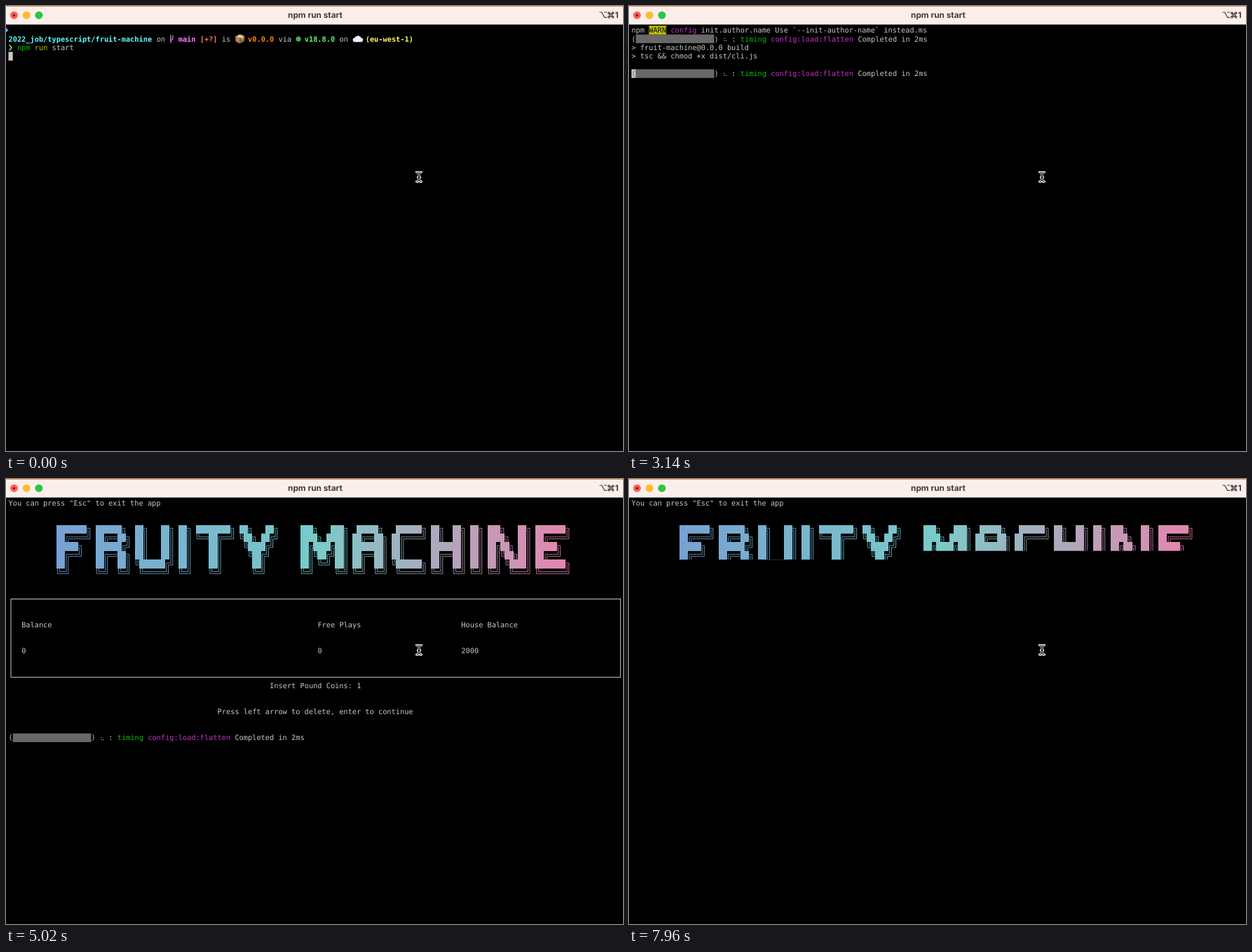
An HTML page that plays this animation: 880 px wide and 636 px high, repeating every 8 s.

```html
<!DOCTYPE html>
<html lang="en">
<head>
<meta charset="utf-8">
<title>npm run start</title>
<style>
  html, body { margin: 0; width: 100%; height: 100%; overflow: hidden; background: #000; }
  svg { display: block; width: 880px; height: 636px; }
  text { font: 10.315px 'DejaVu Sans Mono', monospace; text-rendering: geometricPrecision; }
  text.b { font-weight: 700; }
  text.ui { font: 700 11.8px Inter, sans-serif; fill: #413c3b; }
</style>
</head>
<body>
<svg viewBox="0 0 880 636">
  <defs>
    <linearGradient id="teen" gradientUnits="userSpaceOnUse" x1="71.8" x2="804.6" y1="0" y2="0">
      <stop offset="0" stop-color="#77a1d3"/>
      <stop offset=".5" stop-color="#79cbca"/>
      <stop offset="1" stop-color="#e684ae"/>
    </linearGradient>
    <clipPath id="partial"><path d="M0 0H880V102.8H409V115.2H0z"/></clipPath>
  </defs>
  <rect width="880" height="636"/>
  <rect width="880" height="26.5" fill="#fceeeb"/>
  <rect width="880" height="1" fill="#f2974f"/>
  <circle cx="11.5" cy="13.2" r="5.5" fill="#fe5f57"/>
  <circle cx="11.5" cy="13.2" r="1.7" fill="#7d0c08"/>
  <circle cx="29.2" cy="13.2" r="5.5" fill="#febb2e"/>
  <circle cx="46.9" cy="13.2" r="5.5" fill="#28c840"/>
  <text class="ui" x="441" y="17" text-anchor="middle">npm run start</text>
  <g fill="none" stroke="#413c3b" stroke-width="1.2">
    <path d="M846.5 9h3.2l4 7.4h3.3M853 9h4"/>
    <path d="M861.2 9.9v6M864.2 9.9v6M859.7 11.4h6M859.7 14.4h6"/>
    <circle cx="859.9" cy="10.1" r="1.3"/><circle cx="865.5" cy="10.1" r="1.3"/>
    <circle cx="859.9" cy="15.7" r="1.3"/><circle cx="865.5" cy="15.7" r="1.3"/>
  </g>
  <text class="ui" x="873.5" y="17" text-anchor="end">1</text>
  <g id="screen"></g>
  <g fill="none" stroke-linecap="round">
    <path id="beam" stroke="#fff" stroke-width="2.8"
      d="M585.6 237.4q3.4 0 3.4 2.6v8.4q0 2.6-3.4 2.6M592.4 237.4q-3.4 0-3.4 2.6v8.4q0 2.6 3.4 2.6M587.4 245h3.2"/>
    <use href="#beam" style="stroke:#000"/>
    <path stroke="#000" stroke-width="1"
      d="M585.6 237.4q3.4 0 3.4 2.6v8.4q0 2.6-3.4 2.6M592.4 237.4q-3.4 0-3.4 2.6v8.4q0 2.6 3.4 2.6M587.4 245h3.2"/>
  </g>
</svg>
<script>
const LOOP = 8000, CW = 6.21, CH = 12.42;
const FG = '#c7c7c7', GREEN = '#00c200', YELLOW = '#c7c400', MAGENTA = '#c930c7';
const px = col => 3.5 + col * CW;
const py = row => 28.3 + row * CH;

const text = (row, col, str, fill = FG, bold = false) =>
  `<text x="${px(col)}" y="${py(row) + 9.8}" fill="${fill}"${bold ? ' class="b"' : ''}>${str}</text>`;
const block = (row, col, n, fill) =>
  `<rect x="${px(col)}" y="${py(row)}" width="${n * CW}" height="${CH}" fill="${fill}"/>`;
const place = (x, y, shapes) => `<g transform="translate(${x} ${y})">${shapes}</g>`;

// Terminal lines
const bar = row => text(row, 0, '(') + block(row, 1, 18, '#686868') + text(row, 19, ')') +
  place(px(21), py(row), [[2.1, 5.8], [2.1, 8.8], [4.7, 8.8]].map(([x, y]) =>
    `<circle cx="${x}" cy="${y}" r=".75" fill="#aaa"/>`).join('')) +
  text(row, 23, ':') + text(row, 25, 'timing', GREEN) +
  text(row, 32, 'config:load:flatten', MAGENTA) + text(row, 52, 'Completed in 2ms');

const carton = place(327, 40.2,
  '<path fill="#dcb07e" d="M0 3.4 7 .4 13.6 3 6.6 6.6z"/><path fill="#b98450" d="M0 3.4 6.6 6.6V13.6L.6 10.4z"/>' +
  '<path fill="#94653b" d="M6.6 6.6 13.6 3 13 10 6.6 13.6z"/><path fill="#eedcbc" d="M3 2 9.6 5v2.6L11 7V4.4L4.6 1.4z"/>');
const cloud = '<path fill="#eef1f6" d="M497.6 51.4a2.9 2.9 0 0 1-.2-5.8 3 3 0 0 1 3-2.4 4 4 0 0 1 6 2.4 2.9 2.9 0 0 1-.2 5.8z"/>';
const branch = '<path d="M234.9 41.5V53M234.9 49.3q3-.8 3-3.6V42" fill="none" stroke="#ff77ff" stroke-width="1.2"/>';

const prompt = '<path fill="#6ea8f2" d="M0 31 3.5 34.5 0 38z"/>' +
  text(1, 0, '2022_job/typescript/fruit-machine', '#60fdff', true) + text(1, 34, 'on') + branch +
  text(1, 39, 'main', '#ff77ff', true) + text(1, 44, '[+?]', '#ff6e67', true) + text(1, 49, 'is') + carton +
  text(1, 55, 'v0.0.0', '#ff8700', true) + text(1, 62, 'via') +
  '<circle cx="417" cy="47.2" r="3.6" fill="#3fae49"/>' +
  text(1, 68, 'v18.8.0', '#5ffa68', true) + text(1, 76, 'on') + cloud +
  text(1, 82, '(eu-west-1)', '#fffc67', true) +
  '<path d="M4.8 55.4 8 59.5 4.8 63.6" fill="none" stroke="#5ffa68" stroke-width="1.6"/>' +
  text(2, 2, 'npm', GREEN) + text(2, 6, 'run', YELLOW) + text(2, 10, 'start') + block(3, 0, 1, FG);

const warn = text(0, 0, 'npm') + block(0, 4, 4, YELLOW) + text(0, 4, 'WARN', '#000') +
  text(0, 9, 'config', MAGENTA) + text(0, 16, 'init.author.name Use `--init-author-name` instead.ms');
const build = warn + bar(1) + text(2, 0, '&gt; fruit-machine@0.0.0 build') +
  text(3, 0, '&gt; tsc &amp;&amp; chmod +x dist/cli.js') + bar(5);
const cursor = block(5, 0, 1, FG) + text(5, 0, '(', '#777');

// Banner
const BANNER = [
  '███████╗ ██████╗  ██╗   ██╗ ██╗ ████████╗ ██╗   ██╗     ███╗   ███╗  █████╗   ██████╗ ██╗  ██╗ ██╗ ███╗   ██╗ ███████╗',
  '██╔════╝ ██╔══██╗ ██║   ██║ ██║ ╚══██╔══╝ ╚██╗ ██╔╝     ████╗ ████║ ██╔══██╗ ██╔════╝ ██║  ██║ ██║ ████╗  ██║ ██╔════╝',
  '█████╗   ██████╔╝ ██║   ██║ ██║    ██║     ╚████╔╝      ██╔████╔██║ ███████║ ██║      ███████║ ██║ ██╔██╗ ██║ █████╗',
  '██╔══╝   ██╔══██╗ ██║   ██║ ██║    ██║      ╚██╔╝       ██║╚██╔╝██║ ██╔══██║ ██║      ██╔══██║ ██║ ██║╚██╗██║ ██╔══╝',
  '██║      ██║  ██║ ╚██████╔╝ ██║    ██║       ██║        ██║ ╚═╝ ██║ ██║  ██║ ╚██████╗ ██║  ██║ ██║ ██║ ╚████║ ███████╗',
  '╚═╝      ╚═╝  ╚═╝  ╚═════╝  ╚═╝    ╚═╝       ╚═╝        ╚═╝     ╚═╝ ╚═╝  ╚═╝  ╚═════╝ ╚═╝  ╚═╝ ╚═╝ ╚═╝  ╚═══╝ ╚══════╝'
];
// Which way each corner's arms point
const CORNERS = { '╔': [1, 1], '╗': [-1, 1], '╚': [1, -1], '╝': [-1, -1] };

function drawBanner() {
  const gap = 1.4;
  let solid = '', lines = '';
  BANNER.forEach((line, r) => [...line].forEach((ch, c) => {
    const x = px(11 + c), y = py(3 + r), cx = x + CW / 2, cy = y + CH / 2;
    if (ch === '█') solid += `M${x} ${y}h${CW}v${CH}h${-CW}z`;
    else if (ch === '═') lines += `M${x} ${cy - gap}h${CW}M${x} ${cy + gap}h${CW}`;
    else if (ch === '║') lines += `M${cx - gap} ${y}v${CH}M${cx + gap} ${y}v${CH}`;
    else if (CORNERS[ch]) {
      const [h, v] = CORNERS[ch];
      for (const d of [-gap, gap])
        lines += `M${cx + h * CW / 2} ${cy + v * d}H${cx + h * d}V${cy + v * CH / 2}`;
    }
  }));
  return `<path d="${solid}" fill="url(#teen)" shape-rendering="crispEdges"/>` +
    `<path d="${lines}" fill="none" stroke="url(#teen)" stroke-width=".8"/>`;
}

// Game screen
const banner = drawBanner();
const exitHint = text(0, 0, 'You can press "Esc" to exit the app');
const leftover = text(0, 35, 'fig:load:flatten', MAGENTA) + text(0, 52, 'Completed in 2ms');
const game = (balance, house) => exitHint + banner +
  `<rect x="7" y="171.5" width="869.4" height="111.8" fill="none" stroke="${FG}"/>` +
  text(14, 3, 'Balance') + text(14, 71, 'Free Plays') + text(14, 104, 'House Balance') +
  text(17, 3, balance) + text(17, 71, 0) + text(17, 104, house);
const insert = coins => text(21, 60, 'Insert Pound Coins:') + text(21, 80, coins) +
  text(24, 48, 'Press left arrow to delete, enter to continue');
const running = text(21, 46, "Game is running, press 'tab' to play - costs 20p");

const lemon = '<ellipse rx="6.4" ry="4.8" transform="rotate(35)" fill="#f7c92f"/>' +
  '<ellipse cx="-1" cy="-1" rx="3.4" ry="2.2" transform="rotate(35)" fill="#fde46a"/>' +
  '<path d="M-6-3q1-3 4-2.6-1 2.6-4 2.6z" fill="#5f9f35"/>';
const peach = '<circle cy=".6" r="5.9" fill="#f4804f"/><circle cx="-1.6" cy="1.2" r="3.9" fill="#fba968"/>' +
  '<path d="M.6-4.6q2 3 .6 6" fill="none" stroke="#d95f42" stroke-width=".8"/>' +
  '<path d="M-4.6-4.4q2.6-2.6 5.2-.4 2.6-2 4.6.6-2.6 1.6-4.8.2-2.4 1.6-5-.4z" fill="#5a9e3a"/>';
const cherry = '<path d="M-3.2 1Q-1-3 3.4-5.6 2.6-2 3 2" fill="none" stroke="#6d9a36" stroke-width="1"/>' +
  '<path d="M-4.6-4.6q4-2.4 8-.8-4 3.2-8 .8z" fill="#55a03a"/>' +
  '<circle cx="-3" cy="2.4" r="3.2" fill="#d7263a"/><circle cx="3" cy="3.2" r="3.1" fill="#c01c30"/>' +
  '<circle cx="-4" cy="1.4" r=".9" fill="#f0707c"/>';
const reels = [lemon, peach, peach, cherry].map((fruit, i) => place(457.4 + i * 3 * CW, 307.9, fruit)).join('');

const STEPS = [
  [0, prompt],
  [420, bar(0)],
  [830, warn],
  [1040, build],
  [3140, build + cursor],
  [3770, game(0, 2000) + leftover + insert('')],
  [3980, game(0, 2000) + leftover + insert('') + bar(27)],
  [5020, game(0, 2000) + insert(1) + bar(27)],
  [5650, game(100, 2000) + running + bar(24)],
  [6910, game(200, 1920) + running + reels + bar(25)],
  [7960, exitHint + `<g clip-path="url(#partial)">${banner}</g>`]
];

const screenEl = document.getElementById('screen');
const start = performance.now();
let shown = -1;
function render() {
  const t = (performance.now() - start) % LOOP;
  const i = STEPS.findLastIndex(([from]) => t >= from);
  if (i !== shown) screenEl.innerHTML = STEPS[shown = i][1];
  requestAnimationFrame(render);
}
render();
</script>
</body>
</html>
```
